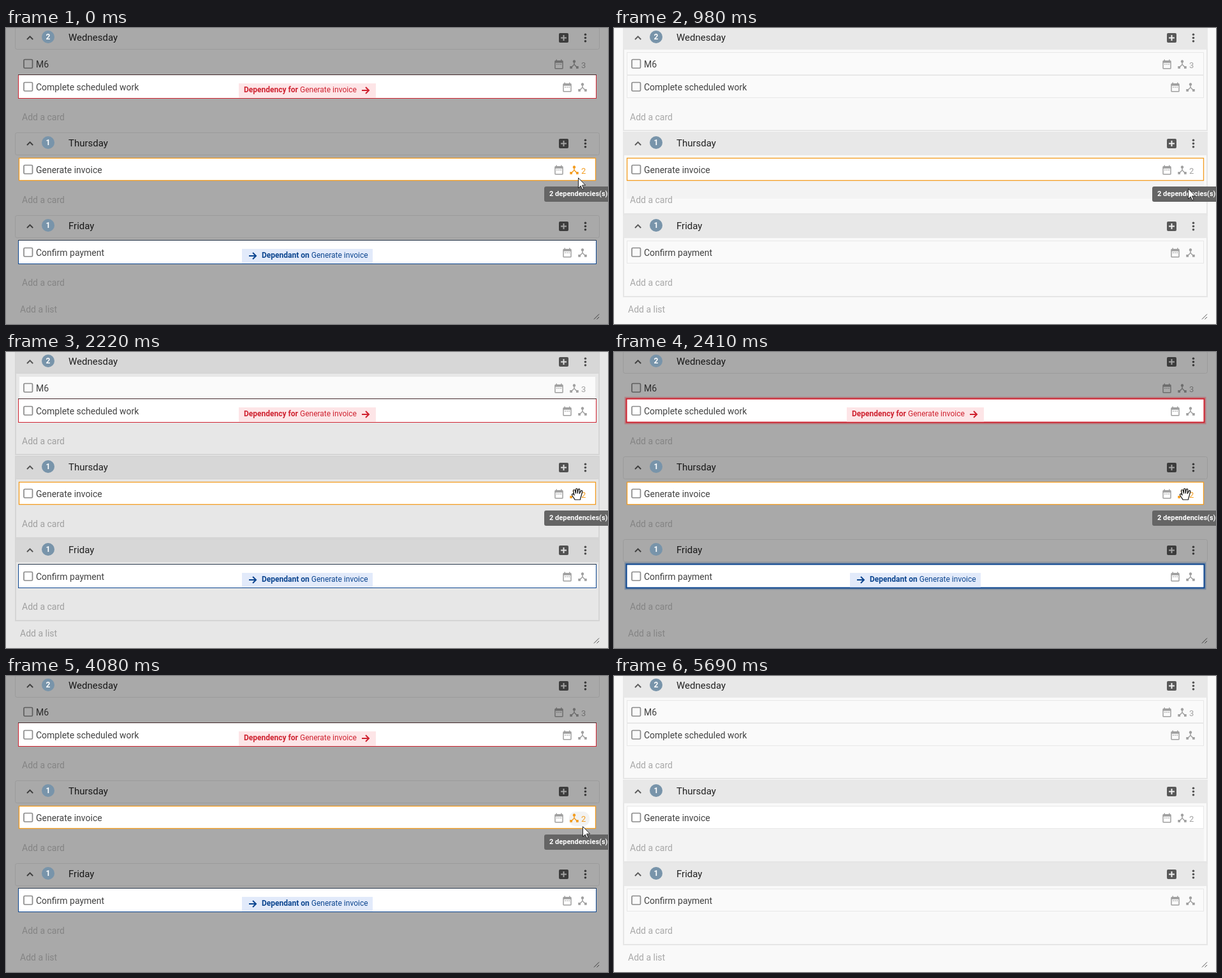
Write an HTML page that moves like this. It is 944 px wide and 465 px high and loops after 6.1 s.

```html
<!DOCTYPE html>
<html lang="en">
<head>
<meta charset="utf-8">
<title>Card dependencies</title>
<style>
  html, body { margin: 0; width: 100%; height: 100%; overflow: hidden; background: #f9f9f9; }
  svg { display: block; width: 944px; height: 465px; font: 14px Roboto, sans-serif; }
  .title { font-size: 15px; fill: #222; }
  .name { fill: #424242; }
  .bold { font-weight: 700; }
  .line { fill: none; stroke-width: 2; }
</style>
</head>
<body>
<svg id="stage" viewBox="0 0 944 465"></svg>
<script>
const LOOP = 6100;
const ORANGE = '#f39c1f', RED = '#cf2230', BLUE = '#0b458f';
const CALENDAR = 'M9 11H7v2h2zm4 0h-2v2h2zm4 0h-2v2h2zM19 4h-1V2h-2v2H8V2H6v2H5Q3 4 3 6V20Q3 22 5 22H19Q21 22 21 20V6Q21 4 19 4zM19 20H5V9h14z';
const TREE = 'M17 16l-4-4V8.82A3 3 0 1 0 11 8.82V12l-4 4H3v5h5v-3.05l4-4.2 4 4.2V21h5v-5z';

const rect = (x, y, w, h, attrs) => `<rect x="${x}" y="${y}" width="${w}" height="${h}" ${attrs}/>`;
const text = (x, y, label, attrs = '') => `<text x="${x}" y="${y}" ${attrs}>${label}</text>`;
const icon = (path, x, y, attrs = 'fill="#a0a0a0"') =>
  `<path d="${path}" fill-rule="evenodd" transform="translate(${x - 9} ${y - 9}) scale(.75)" ${attrs}/>`;

const lists = [
  { y: -2, end: 161, title: 'Wednesday', count: 2 },
  { y: 164, end: 292, title: 'Thursday', count: 1 },
  { y: 294, end: 422, title: 'Friday', count: 1 }
];

function listFrame({ y, end }) {
  return rect(15, y, 915, end - y, 'fill="none" stroke="#e6e6e6" stroke-width="2"') +
    rect(14, y, 917, 36, 'fill="#e8e8e8" rx="3"');
}

function listControls({ y, title }) {
  const mid = y + 17;
  const dots = [-5.3, 0, 5.3].map(d => `<circle cx="908.5" cy="${mid + d + .5}" r="1.8" fill="#555"/>`).join('');
  return `<path d="M33 ${mid + 3}l4.6-4.6 4.6 4.6" class="line" stroke="#5c5c5c"/>` +
    text(98, mid + 5, title, 'class="title"') +
    rect(867, mid - 7, 15, 15, 'rx="2" fill="#585858"') +
    `<path d="M870 ${mid + .5}h9m-4.5-4.5v9" class="line" stroke="#f0f0f0"/>` + dots;
}

function badge({ y, count }) {
  return `<circle cx="66" cy="${y + 16}" r="10" fill="#7894aa"/>` +
    text(66, y + 20.3, count, 'class="bold" font-size="12" fill="#fff" text-anchor="middle"');
}

function row(y, name, count, id = '') {
  const shift = count ? -13 : 0;
  const fill = `${id && `id="${id}"`} fill="#a0a0a0"`;
  return rect(28, y - 7.5, 13.5, 13.5, 'rx="1.5" fill="none" stroke="#8b8b8b" stroke-width="1.7"') +
    text(47, y + 5, name, 'class="name"') +
    icon(CALENDAR, 880 + shift, y) +
    `<g ${fill}>${icon(TREE, 904 + shift, y, '')}${count ? text(902, y + 6, count, 'font-size="13"') : ''}</g>`;
}

const card = (y, fill = '#fafafa') => rect(20.5, y + .5, 904, 35, `fill="${fill}" stroke="#e8e8e8"`);

function highlight(y, color, dark) {
  return rect(19.5, y + .5, 906, 37, `fill="#fff" stroke="${color}"`) +
    `<path d="M19 ${y + .5}h907" stroke="${dark}"/>`;
}

function glow(y, color) {
  return rect(18, y - 1, 909, 40, `fill="none" stroke="${color}" stroke-width="3" opacity=".3"`) +
    rect(19.5, y + .5, 906, 37, `class="line" stroke="${color}"`);
}

function tag(x, y, w, color, tint, textX, arrowX, label) {
  return rect(x, y, w, 22.5, `fill="${tint}"`) +
    text(textX, y + 14, `<tspan class="bold">${label}</tspan> Generate invoice`, `font-size="12" fill="${color}"`) +
    `<path d="M${arrowX} ${y + 11}h11m-5-5l5 5-5 5" class="line" stroke="${color}" stroke-width="1.7"/>`;
}

const stage = document.getElementById('stage');
stage.innerHTML = `
  <rect width="944" height="465" fill="#f9f9f9"/>
  <g id="surfaces">
    ${lists.map(listFrame).join('')}
    <rect id="hoverArea" x="20" y="240" width="905" fill="#f3f3f3"/>
    ${card(38)}${card(74)}${card(334)}
  </g>
  ${lists.map(listControls).join('')}
  <path d="M922 457.5l8-8M926.5 457.5l3.5-3.5" stroke="#555"/>
  <g id="plainRow">${row(57, 'M6', 3)}</g>
  <rect id="shade" width="944" height="465"/>
  <g id="lateCard">${card(38)}${row(57, 'M6', 3)}</g>
  <g id="outlines">${lists.map(l => rect(14.5, l.y + .5, 916, 35, 'rx="3" fill="none" stroke="#9b9b9b"')).join('')}</g>
  ${lists.map(badge).join('')}
  <g id="prompts">
    ${[145, 275, 405].map(y => text(25, y, 'Add a card')).join('')}${text(22, 447, 'Add a list')}
  </g>
  <g id="linked">${highlight(73, RED, '#44292c')}${highlight(333, BLUE, '#26364a')}</g>
  <g id="glow">${glow(73, RED)}${glow(333, BLUE)}</g>
  ${card(204, '#fff')}
  <rect id="activeBorder" x="20.5" y="204.5" width="904" height="35" fill="none" stroke="${ORANGE}" stroke-width="1.3"/>
  <rect id="iconHover" x="883" y="213" width="32" height="23" rx="10" fill="#f2f2f2"/>
  ${row(93, 'Complete scheduled work')}
  ${row(223, 'Generate invoice', 2, 'activeIcon')}
  ${row(353, 'Confirm payment')}
  <g id="tags">
    ${tag(365, 87, 215, RED, '#fde5e7', 373, 558, 'Dependency for')}
    ${tag(370, 347, 205, BLUE, '#e2eafa', 401, 381, 'Dependant on')}
  </g>
  <g id="tooltip">
    ${rect(844, 249, 110, 24, 'rx="3" fill="#656565"')}
    ${text(852, 264, '2 dependencies(s)', 'class="bold" font-size="11" fill="#fff"')}
  </g>
  <g id="cursor" stroke-linejoin="round">
    <path id="arrow" d="M.5 .5V16.5L4.2 13L6.8 18.6L9 17.6L6.5 12H11.7Z" fill="#fff" stroke="#222"/>
    <path id="hand" d="M-4 9C-5 6-9 3-8.5 1S-6-.5-5 2L-6.5-5C-6.5-7-4-7-3.5-5L-2.5-1V-7C-2.5-9 0-9 0-7L.3-1L1.5-7C2-8.6 4-8 3.8-6.3L3.2-.5L5.5-4.5C6.5-6 8.3-5 7.7-3.3C6.5 0 6.5 3 5 6L4.5 9Z" fill="#fff" stroke="#111" stroke-width="1.2"/>
    <path id="beam" d="M-3-7.5h2.5L0-7L.5-7.5H3M0-7V7M-3 7.5h2.5L0 7L.5 7.5H3" fill="none" stroke="#222"/>
  </g>`;

const part = {};
stage.querySelectorAll('[id]').forEach(el => part[el.id] = el);

const ramp = (t, a, b) => Math.min(1, Math.max(0, (t - a) / (b - a)));
const within = (t, a, b) => t >= a && t < b;
const opacity = (name, value) => part[name].setAttribute('opacity', value);
const show = (name, on) => opacity(name, on ? 1 : 0);

// time, x, y
const path = [
  [60, 897, 235], [670, 900, 252], [980, 900, 252], [1550, 898, 235],
  [1850, 896, 223], [3840, 896, 223], [4040, 904, 236], [4090, 904, 236],
  [4400, 908, 254], [4740, 920, 285], [4800, 920, 285], [5030, 922, 293], [5650, 938, 468]
];

function cursorAt(t) {
  const i = path.findIndex(p => p[0] > t);
  if (i === 0) return path[0].slice(1);
  if (i < 0) return path[path.length - 1].slice(1);
  const [a, b] = [path[i - 1], path[i]];
  const k = ramp(t, a[0], b[0]);
  return [a[1] + (b[1] - a[1]) * k, a[2] + (b[2] - a[2]) * k];
}

function draw(t) {
  const dim = t < 2000 ? 1 - ramp(t, 60, 360)
    : t < 4000 ? ramp(t, 2168, 2400)
    : 1 - ramp(t, 4100, 4390);
  const linked = Math.min(1, dim * 5);
  opacity('shade', dim * .32);
  opacity('surfaces', 1 - dim * dim);
  opacity('outlines', dim * dim);
  opacity('linked', linked);
  opacity('tags', linked);
  show('lateCard', within(t, 2168, 2250));
  opacity('glow', ramp(t, 2250, 2350) * (1 - ramp(t, 2890, 3010)));
  const grey = Math.round(168 - 36 * dim);
  part.prompts.setAttribute('fill', `rgb(${grey},${grey},${grey})`);

  show('activeBorder', t < 4500);
  show('hoverArea', within(t, 200, 1650) || t > 4400);
  part.hoverArea.setAttribute('height', t < 1650 ? 28 : 51);
  const active = t < 100 || within(t, 1650, 4150);
  part.activeIcon.setAttribute('fill', active ? ORANGE : '#a0a0a0');
  show('iconHover', within(t, 3900, 4150));
  opacity('tooltip', 1 - ramp(t, 4900, 5020));

  const [x, y] = cursorAt(t);
  part.cursor.setAttribute('transform', `translate(${Math.round(x)} ${Math.round(y)})`);
  const hand = within(t, 1800, 3920), beam = within(t, 4460, 5060);
  show('hand', hand);
  show('beam', beam);
  show('arrow', !hand && !beam);
  show('cursor', t < 5690);
}

const start = performance.now();
function tick() {
  draw((performance.now() - start) % LOOP);
  requestAnimationFrame(tick);
}
draw(0);
requestAnimationFrame(tick);
</script>
</body>
</html>
```
